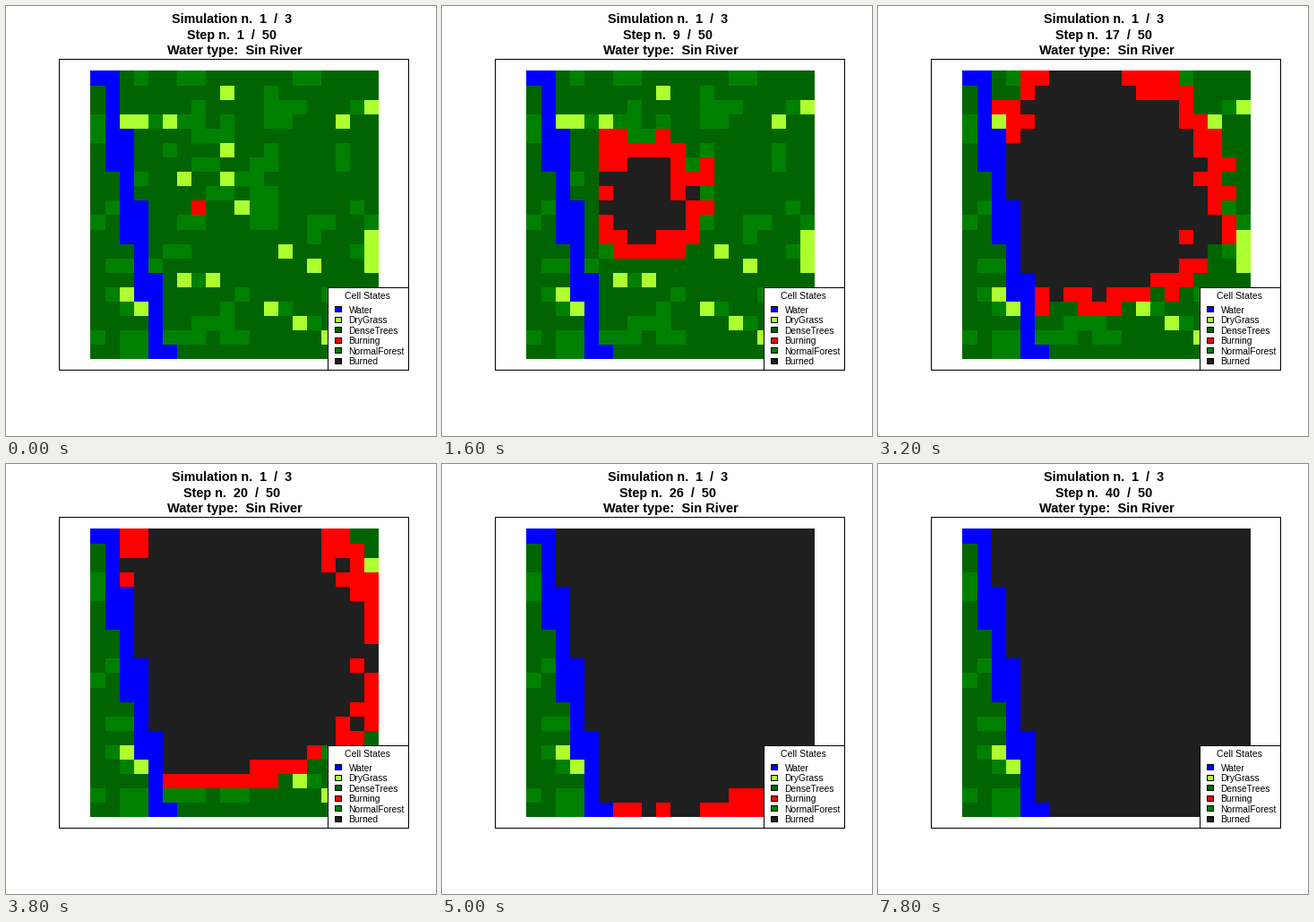
Animation, 480 px wide and 480 px high, one loop 8 s. Source, as a matplotlib script:

```python
import matplotlib.pyplot as plt
import numpy as np
from matplotlib.animation import FuncAnimation
from matplotlib.colors import ListedColormap
from matplotlib.patches import Rectangle

STATES = [("Water", "#0000ff"), ("DryGrass", "#adff2f"), ("DenseTrees", "#006400"),
          ("Burning", "#ff0000"), ("NormalForest", "#008000"), ("Burned", "#1f1f1f")]
WATER, DRY, DENSE, BURNING, NORMAL, BURNED = range(6)
SIZE, STAGE, STEPS, INTERVAL = 20, 480, 40, 200
LEFT, TOP, SPAN = 94, 72, 322  # the map on the stage, in pixels
PX = 0.9  # points per pixel at 80 dpi

SPARK = (9, 7)  # row and column of the first burning cell
GRASS = [(1, 9), (2, 19), (3, 2), (3, 3), (3, 5), (3, 17), (5, 9), (7, 6), (7, 9),
         (9, 10), (11, 19), (12, 13), (12, 19), (13, 15), (13, 19), (14, 6),
         (14, 8), (15, 2), (16, 3), (16, 12), (17, 14), (18, 16)]
WEST_FOREST = [(3, 0), (4, 0), (9, 1), (10, 0), (13, 1), (13, 2), (15, 1), (16, 2),
               (18, 0), (18, 2), (18, 3), (19, 2), (19, 3)]

rng = np.random.default_rng(11)
rows, cols = np.indices((SIZE, SIZE))

# Each bank moves one column east at the listed rows.
west_bank = np.searchsorted([1, 7, 12, 16], rows, side="right")
east_bank = 1 + np.searchsorted([4, 9, 14, 19], rows, side="right")
east = cols > east_bank


def build_land():
    seeds = rng.random((SIZE, SIZE)) < 0.14
    spread = np.roll(seeds, 1, axis=1) & (rng.random(seeds.shape) < 0.5)
    land = np.where((seeds | spread) & east, NORMAL, DENSE)
    land[tuple(zip(*WEST_FOREST))] = NORMAL
    land[tuple(zip(*GRASS))] = DRY
    land[(cols >= west_bank) & (cols <= east_bank)] = WATER
    return land


def burn_times():
    """Step at which each cell catches fire and step at which it is burned out."""
    dy, dx = rows - SPARK[0], cols - SPARK[1]
    # The front runs slower towards the south and the river.
    reach = np.hypot(dx * np.where(dx > 0, 1.05, 2.1), dy * np.where(dy > 0, 1.65, 1.05))
    jitter = rng.uniform(-1.3, 1.3, reach.shape)
    start = np.maximum(2, np.round(2 + 1.3 * reach + jitter))
    start[SPARK] = 1
    end = start + rng.integers(2, 4, reach.shape)
    start[~east] = end[~east] = np.inf
    return start, end


LAND = build_land()
START, END = burn_times()
SCALE = np.arange(SPAN) * SIZE // SPAN  # cell index under each map pixel


def cells_at(step):
    cells = np.where(step >= START, BURNING, LAND)
    cells = np.where(step >= END, BURNED, cells)
    return cells[np.ix_(SCALE, SCALE)]


plt.rcParams["font.family"] = "Liberation Sans"
fig = plt.figure(figsize=(6, 6), dpi=80, facecolor="white")
ax = fig.add_axes([0, 0, 1, 1])


def box(x, y, w, h, fill="white", z=2):
    """Filled box with a black border one pixel wide inside its edge."""
    for inset, color in ((0, "black"), (1, fill)):
        ax.add_patch(Rectangle((x + inset, y + inset), w - 2 * inset, h - 2 * inset,
                               facecolor=color, linewidth=0, antialiased=False, zorder=z))


def label(x, y, text, size, **kw):
    return ax.text(x, y, text, fontsize=size * PX, va="baseline", zorder=4, **kw)


image = ax.imshow(cells_at(1), cmap=ListedColormap([c for _, c in STATES]),
                  vmin=-0.5, vmax=5.5, interpolation="nearest", aspect="auto",
                  extent=(LEFT, LEFT + SPAN, TOP + SPAN, TOP), zorder=1)
ax.set(xlim=(0, STAGE), ylim=(STAGE, 0))
ax.axis("off")

box(59, 59, 391, 348, z=0)
box(359, 314, 91, 93)
label(403.5, 327.3, "Cell States", 10.5, ha="center")
for i, (name, color) in enumerate(STATES):
    y = 338.5 + 11.52 * i
    box(367, round(y - 3.5), 8, 7, color, z=3)
    label(382.5, y + 4.2, name, 10.2)

head = dict(weight="bold", ha="center")
label(252.4, 19, "Simulation n.  1  /  3", 14.4, **head)
counter = label(252.4, 36.5, "", 14.4, **head)
label(255.4, 54, "Water type:  Sin River", 14.6, **head)


def update(frame):
    step = frame + 1
    image.set_data(cells_at(step))
    counter.set_text(f"Step n.  {step}  /  50")
    return image, counter


anim = FuncAnimation(fig, update, frames=STEPS, interval=INTERVAL,
                     repeat=True, repeat_delay=0)
plt.show()
```
